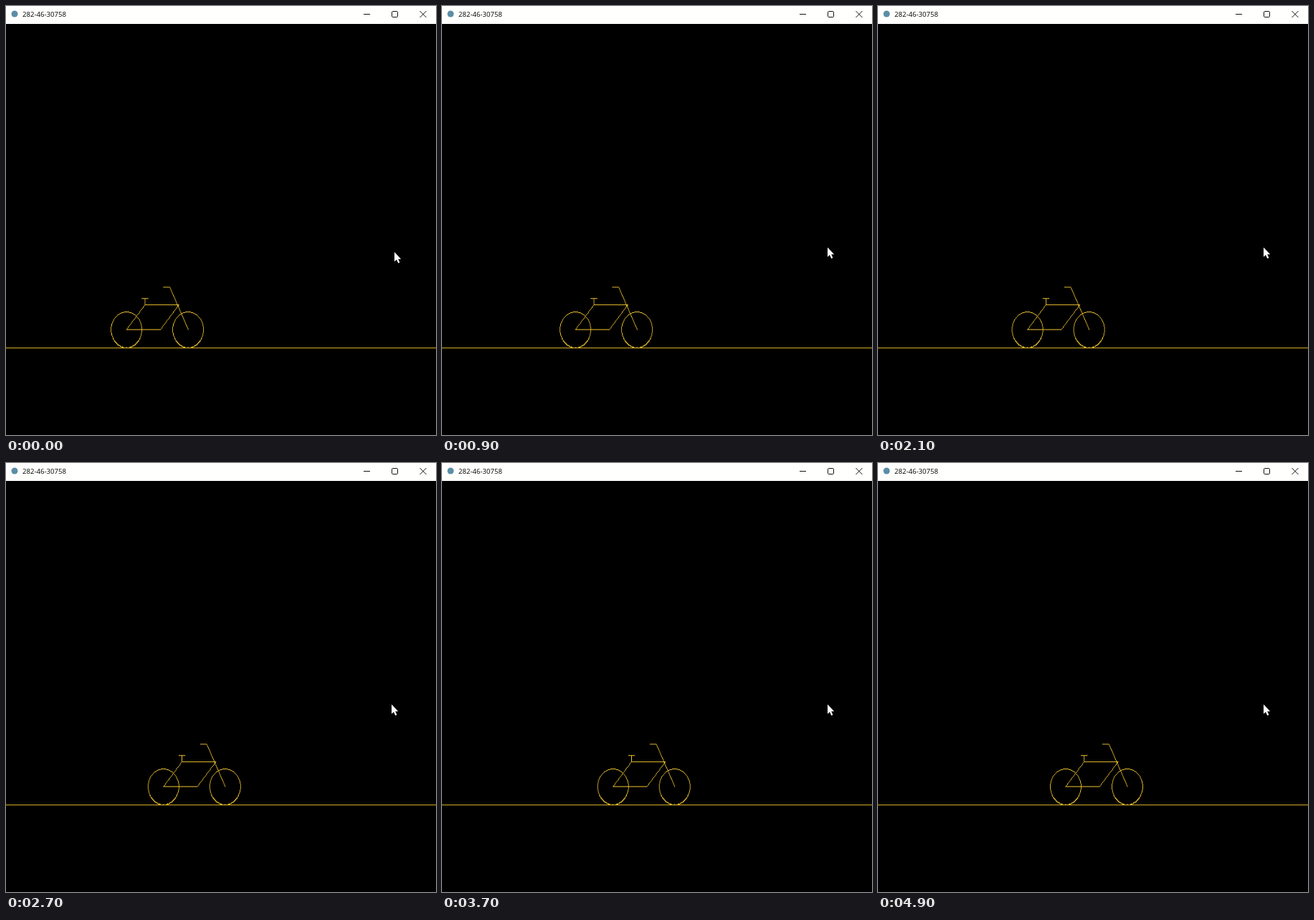
An HTML page with a canvas that plays this animation: 600 px wide and 598 px high, repeating every 5 s.

```html
<!DOCTYPE html>
<html lang="en">
<head>
<meta charset="utf-8">
<title>Bicycle</title>
<style>
  html, body { margin: 0; width: 100%; height: 100%; overflow: hidden; background: #000; }
  #stage { position: relative; width: 600px; height: 598px; background: #000; overflow: hidden; }
  #bar { position: absolute; left: 0; top: 0; width: 600px; height: 25px; background: #fffffd; }
  #title { position: absolute; left: 23px; top: 4px; font: 9.6px/15px "Open Sans", "Noto Sans", sans-serif; color: #000; white-space: pre; }
  canvas, svg { position: absolute; left: 0; top: 0; }
</style>
</head>
<body>
<div id="stage">
  <canvas id="view" width="600" height="598"></canvas>
  <div id="bar"><span id="title">282-46-30758</span></div>
  <svg width="600" height="598" fill="none" stroke="#111" stroke-width="1">
    <circle cx="12" cy="11" r="4.5" fill="#5b8ea6" stroke="none"/>
    <path d="M499 11.5H508"/>
    <rect x="538.5" y="7.5" width="8" height="8" rx="1.2"/>
    <path d="M577.5 7L586.5 16M586.5 7L577.5 16"/>
    <path id="pointer" d="M0 0V13.2L3 10.6L5.3 15.6L7.4 14.6L5.2 9.8H9.2Z" fill="#fff" stroke="none"/>
  </svg>
</div>
<script>
const LOOP = 5000, STEP = 100;
const view = document.getElementById('view').getContext('2d');
const pointer = document.getElementById('pointer');

// The scene is plotted on a wider pixel grid, then squeezed onto the stage
const SCALE_X = 0.86, SCALE_Y = 0.985, TOP = 381.6;
const grid = document.createElement('canvas');
grid.width = 700;
grid.height = 110;
const ctx = grid.getContext('2d');

// [time, value] tables; hub in grid pixels, pointer in stage pixels
const hubX = [[0, 195], [500, 207], [1300, 225], [2100, 242], [3300, 268], [4200, 288], [4900, 304]];
const pointerX = [[500, 542], [800, 538]];
const pointerY = [[500, 343], [800, 336.5]];

// Line segments relative to the rear hub
const HUB_Y = 70, WHEEL_BASE = 100, RADIUS = 25, GROUND_Y = HUB_Y + 26;
const bars = [
  [0, 0, 55, 0], [55, 0, 85, -35], [85, -35, 30, -35], [30, -35, 0, 0],
  [30, -35, 30, -44], [25, -44, 35, -44],
  [100, 0, 70, -60], [70, -60, 60, -60]
];

function at(table, t) {
  if (t <= table[0][0]) return table[0][1];
  for (let i = 1; i < table.length; i++) {
    const [t0, v0] = table[i - 1], [t1, v1] = table[i];
    if (t <= t1) return v0 + (v1 - v0) * (t - t0) / (t1 - t0);
  }
  return table[table.length - 1][1];
}

function dot(x, y) {
  ctx.fillRect(Math.round(x), Math.round(y), 1, 1);
}

function line(x0, y0, x1, y1) {
  const n = Math.max(Math.abs(x1 - x0), Math.abs(y1 - y0));
  for (let i = 0; i <= n; i++) dot(x0 + (x1 - x0) * i / n, y0 + (y1 - y0) * i / n);
}

// Circle whose lower edge rests on the ground row
function wheel(cx) {
  const cy = HUB_Y + 0.5, ry = RADIUS + 0.5;
  for (let i = -RADIUS; i <= RADIUS; i++) {
    const k = Math.sqrt(1 - (i / RADIUS) ** 2);
    dot(cx + i, cy - ry * k);
    dot(cx + i, cy + ry * k);
    dot(cx - RADIUS * k, HUB_Y + i);
    dot(cx + RADIUS * k, HUB_Y + i);
  }
}

function draw(time) {
  const t = Math.floor(time % LOOP / STEP) * STEP;
  const x = Math.round(at(hubX, t));
  ctx.clearRect(0, 0, grid.width, grid.height);
  ctx.fillStyle = '#e0b62a';
  ctx.fillRect(0, GROUND_Y, grid.width, 1);
  ctx.fillStyle = '#f2c632';
  for (const [x0, y0, x1, y1] of bars) line(x + x0, HUB_Y + y0, x + x1, HUB_Y + y1);
  wheel(x);
  wheel(x + WHEEL_BASE);

  view.clearRect(0, 0, 600, 598);
  view.drawImage(grid, 0, TOP, grid.width * SCALE_X, grid.height * SCALE_Y);
  pointer.setAttribute('transform', `translate(${at(pointerX, t)} ${at(pointerY, t)})`);
}

const start = performance.now();
function tick() {
  draw(performance.now() - start);
  requestAnimationFrame(tick);
}
tick();
</script>
</body>
</html>
```
